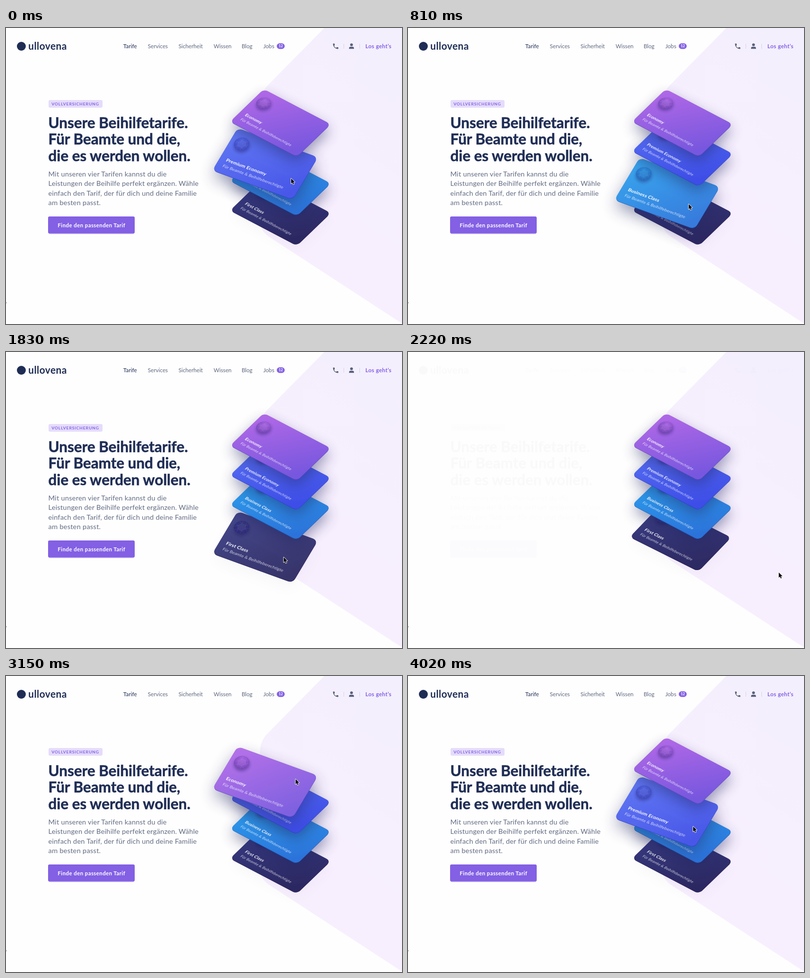
An HTML page with a canvas for the animation above (4050 ms loop, 800 by 600 pixels).

```html
<!DOCTYPE html>
<html lang="de">
<head>
<meta charset="utf-8">
<title>Beihilfetarife</title>
<style>
  html, body { margin: 0; width: 100%; height: 100%; overflow: hidden; background: #fefefe; }
  canvas, svg { position: absolute; left: 0; top: 0; width: 800px; height: 600px; }
  text { font-family: Lato, "Open Sans", sans-serif; white-space: pre; }
  .nav { font-size: 11.2px; fill: #5f6880; }
  .nav .on { fill: #1f2d55; }
  .head { font-size: 30px; font-weight: 700; fill: #1f2d55; stroke: #1f2d55; stroke-width: .5px; }
  .copy { font-size: 14px; letter-spacing: .22px; fill: #626b83; }
  .bold { font-weight: 700; }
</style>
</head>
<body>
<canvas id="stage" width="800" height="600"></canvas>
<svg viewBox="0 0 800 600">
  <g id="header">
    <circle cx="31" cy="37" r="9" fill="#1f2d55"/>
    <text x="45" y="44" class="bold" font-size="20" letter-spacing=".4" fill="#1f2d55">ullovena</text>
    <g class="nav">
      <text class="on" x="237" y="41">Tarife</text>
      <text x="286.5" y="41">Services</text>
      <text x="348.5" y="41">Sicherheit</text>
      <text x="419.5" y="41">Wissen</text>
      <text x="476" y="41">Blog</text>
      <text x="520" y="41">Jobs</text>
    </g>
    <rect x="547" y="31" width="16" height="11.5" rx="5.75" fill="#8360e4"/>
    <text x="555" y="39.4" class="bold" font-size="7.5" text-anchor="middle" fill="#fff">12</text>
    <g fill="#56607a">
      <path transform="translate(658.8 29.8) scale(.6)" d="M6.62 10.79c1.44 2.83 3.76 5.14 6.59 6.59l2.2-2.2c.27-.27.67-.36 1.02-.24 1.12.37 2.33.57 3.57.57.55 0 1 .45 1 1V20c0 .55-.45 1-1 1-9.39 0-17-7.61-17-17 0-.55.45-1 1-1h3.5c.55 0 1 .45 1 1 0 1.25.2 2.45.57 3.57.11.35.03.74-.25 1.02z"/>
      <circle cx="698" cy="34" r="2.8"/>
      <path d="M693 42.3v-1.5q0-2.9 3-2.9h4q3 0 3 2.9v1.5z"/>
    </g>
    <path d="M682.5 32v10M714.5 32v10" stroke="#d8d3e8"/>
    <text x="726" y="41" class="bold" font-size="11.3" letter-spacing=".35" fill="#8360e4">Los geht’s</text>
  </g>
  <g id="badge">
    <rect x="86" y="146" width="109" height="15.5" rx="3" fill="#e5dcfb"/>
    <text x="92" y="156.9" class="bold" font-size="8.3" letter-spacing=".78" fill="#8360e4">VOLLVERSICHERUNG</text>
  </g>
  <g id="copy">
    <g class="head">
      <text x="85.5" y="203">Unsere Beihilfetarife.</text>
      <text x="85.5" y="236.3">Für Beamte und die,</text>
      <text x="85.5" y="269.7">die es werden wollen.</text>
    </g>
    <g class="copy">
      <text x="85.5" y="300.8">Mit unseren vier Tarifen kannst du die</text>
      <text x="85.5" y="320.1">Leistungen der Beihilfe perfekt ergänzen. Wähle</text>
      <text x="85.5" y="339.5">einfach den Tarif, der für dich und deine Familie</text>
      <text x="85.5" y="358.8">am besten passt.</text>
    </g>
  </g>
  <g id="button">
    <rect x="86" y="384" width="173" height="34" rx="3" fill="#d9cff6"/>
    <rect x="85" y="382" width="175" height="34.5" rx="3" fill="#8360e4"/>
    <text x="104.5" y="404" class="bold" font-size="11" letter-spacing=".38" fill="#fff">Finde den passenden Tarif</text>
  </g>
</svg>
<script>
const LOOP = 4050, MOVE = 400, W = 160, H = 100;
const ctx = document.getElementById('stage').getContext('2d');
const parts = ['header', 'badge', 'copy', 'button'].map(id => document.getElementById(id));

// Linear part of the card transform, at rest and hovered
const REST = [0.844, 0.444, -0.68, 0.66];
const HOVER = [1.0125, 0.369, -0.51, 0.858];

const cards = [
  { name: 'First Class', y: 372.3, up: 1200, down: 2010, fill: ['#363980', '#2b2761'], edge: '#231f54', shade: 0.03 },
  { name: 'Business Class', y: 312.3, up: 330, down: 1200, fill: ['#2a9dec', '#2b73da'], edge: '#1f60bd', shade: 0.46 },
  { name: 'Premium Economy', y: 252.3, up: 3480, down: 330, fill: ['#546bf1', '#3d4de7'], edge: '#3340c4', shade: 0.46 },
  { name: 'Economy', y: 192.3, up: 2680, down: 3480, fill: ['#ad67e6', '#7757de'], edge: '#6146c0', shade: 0.46 }
];

// Pointer path: time, x, y
const path = [
  [0, 576, 305], [120, 576, 305], [330, 571, 343], [560, 567, 357], [1000, 567, 357],
  [1200, 563, 403], [1450, 561, 416], [1830, 561, 416], [2010, 625, 432], [2220, 749, 447],
  [2450, 742, 330], [2670, 642, 197], [2860, 592, 207], [3100, 585, 209], [3260, 585, 209],
  [3480, 580, 287], [3720, 576, 305], [LOOP, 576, 305]
];

const clamp = v => Math.min(1, Math.max(0, v));
const mix = (a, b, k) => a + (b - a) * k;
const smooth = p => p * p * (3 - 2 * p);
const ease = v => { const p = clamp(v); return smooth(1 - (1 - p) * (1 - p)); };

function slope(i, axis) {
  if (i < 1 || i > path.length - 2) return 0;
  const rate = j => (path[j + 1][axis] - path[j][axis]) / (path[j + 1][0] - path[j][0]);
  const a = rate(i - 1), b = rate(i);
  return a * b > 0 ? 2 * a * b / (a + b) : 0;
}

function pointerAt(t, axis) {
  let i = 0;
  while (i < path.length - 2 && t >= path[i + 1][0]) i++;
  const a = path[i], b = path[i + 1], d = b[0] - a[0], p = (t - a[0]) / d, q = 1 - p;
  return mix(a[axis], b[axis], smooth(p))
    + d * p * q * (q * slope(i, axis) - p * slope(i + 1, axis));
}

function liftAt(card, t) {
  return (card.down < card.up ? 1 : 0) + ease((t - card.up) / MOVE) - ease((t - card.down) / MOVE);
}

function drawBackdrop() {
  const g = ctx.createLinearGradient(540, 440, 800, 60);
  g.addColorStop(0, '#f8effe');
  g.addColorStop(1, '#f4effd');
  ctx.fillStyle = g;
  ctx.beginPath();
  ctx.moveTo(643, 0);
  ctx.lineTo(529, 116);
  ctx.quadraticCurveTo(513, 132, 513, 155);
  ctx.lineTo(513, 390);
  ctx.quadraticCurveTo(513, 412, 534, 425);
  ctx.lineTo(800, 599);
  ctx.lineTo(800, 0);
  ctx.fill();
  ctx.fillStyle = '#777';
  ctx.fillRect(0, 556, 1, 2);
}

function ring(n, r, turn) {
  return Array.from({ length: n }, (_, i) => {
    const a = turn + i * 2 * Math.PI / n;
    return [22.3 + r * Math.cos(a), 28.2 + r * Math.sin(a)];
  });
}

function trace(points) {
  ctx.beginPath();
  points.forEach(p => ctx.lineTo(p[0], p[1]));
  ctx.closePath();
}

function drawGem(color) {
  const outer = ring(12, 14.2, 0.26), inner = ring(6, 7.6, 0.1);
  ctx.save();
  ctx.shadowColor = 'rgba(25,20,90,.45)';
  ctx.shadowBlur = 7;
  ctx.shadowOffsetY = 4;
  ctx.fillStyle = color;
  trace(outer);
  ctx.fill();
  ctx.restore();
  const g = ctx.createRadialGradient(20, 20, 2, 22.3, 27, 17);
  g.addColorStop(0, 'rgba(40,20,120,.08)');
  g.addColorStop(0.6, 'rgba(35,20,115,.24)');
  g.addColorStop(1, 'rgba(25,15,100,.42)');
  ctx.fillStyle = g;
  ctx.fill();
  ctx.strokeStyle = 'rgba(255,255,255,.11)';
  ctx.lineWidth = 0.6;
  trace(inner);
  ctx.fillStyle = 'rgba(255,255,255,.05)';
  ctx.fill();
  ctx.stroke();
  ctx.beginPath();
  inner.forEach((p, i) => {
    for (const o of [outer[2 * i], outer[(2 * i + 11) % 12]]) {
      ctx.moveTo(p[0], p[1]);
      ctx.lineTo(o[0], o[1]);
    }
  });
  ctx.stroke();
}

function label(text, y, font, spacing, color) {
  ctx.font = font + ' Lato, "Open Sans", sans-serif';
  ctx.letterSpacing = spacing;
  ctx.fillStyle = color;
  ctx.fillText(text, 12.5, y);
}

function drawCard(card, t) {
  const k = liftAt(card, t);
  const [a, b, c, d] = REST.map((v, i) => mix(v, HOVER[i], k));
  const x = mix(554.3, 523.5, k) - (a * W + c * H) / 2;
  const y = card.y + 22.8 * k - (b * W + d * H) / 2;
  const face = dy => {
    ctx.setTransform(a, b, c, d, x, y + dy);
    ctx.beginPath();
    ctx.roundRect(0, 0, W, H, 9.5);
    ctx.fill();
  };
  ctx.save();
  ctx.shadowColor = `rgba(32,36,96,${card.shade})`;
  ctx.shadowBlur = mix(28, 32, k);
  ctx.shadowOffsetY = mix(11, 13, k);
  ctx.fillStyle = card.edge;
  face(0.8);
  ctx.restore();

  ctx.save();
  const g = ctx.createLinearGradient(20, 0, 140, 100);
  g.addColorStop(0, card.fill[0]);
  g.addColorStop(1, card.fill[1]);
  ctx.fillStyle = g;
  face(0);
  ctx.fillStyle = `rgba(255,255,255,${0.06 * k})`;
  ctx.fill();
  drawGem(card.fill[0]);
  label(card.name, 73, '700 9.3px', '0.15px', '#fff');
  label('Für Beamte & Beihilfeberechtigte', 86.3, '400 8.1px', '0.08px', 'rgba(255,255,255,.78)');
  ctx.restore();
}

function drawPointer(t) {
  ctx.save();
  ctx.translate(pointerAt(t, 1), pointerAt(t, 2));
  trace([[0, 0], [0, 10.4], [2.4, 8.2], [4, 12], [5.9, 11.2], [4.3, 7.5], [7.5, 7.3]]);
  ctx.lineJoin = 'round';
  ctx.lineWidth = 1.6;
  ctx.strokeStyle = '#fff';
  ctx.stroke();
  ctx.fillStyle = '#0b0b12';
  ctx.fill();
  ctx.restore();
}

function placePage(t) {
  const entering = t > 2300;
  const p = clamp((t - 2370) / 620);
  const left = entering ? 1 - smooth(p) : 0;
  const alpha = entering ? smooth(p) : 1 - smooth(clamp((t - 1980) / 260));
  const shift = [-64, 200, 94, 277];
  parts.forEach((el, i) => {
    let tf = `translate(0 ${shift[i] * left})`;
    if (i === 0) tf += ` translate(400 37) scale(${1 + 0.0305 * left}) translate(-400 -37)`;
    el.setAttribute('transform', tf);
    el.setAttribute('opacity', entering && i === 1 ? Math.pow(alpha, 1.5) : alpha);
  });
}

function frame(now) {
  const t = now % LOOP;
  ctx.setTransform(1, 0, 0, 1, 0, 0);
  ctx.fillStyle = '#fefefe';
  ctx.fillRect(0, 0, 800, 600);
  drawBackdrop();
  cards.forEach(card => drawCard(card, t));
  drawPointer(t);
  placePage(t);
}

const start = performance.now();
function tick() {
  frame(performance.now() - start);
  requestAnimationFrame(tick);
}
tick();
</script>
</body>
</html>
```
